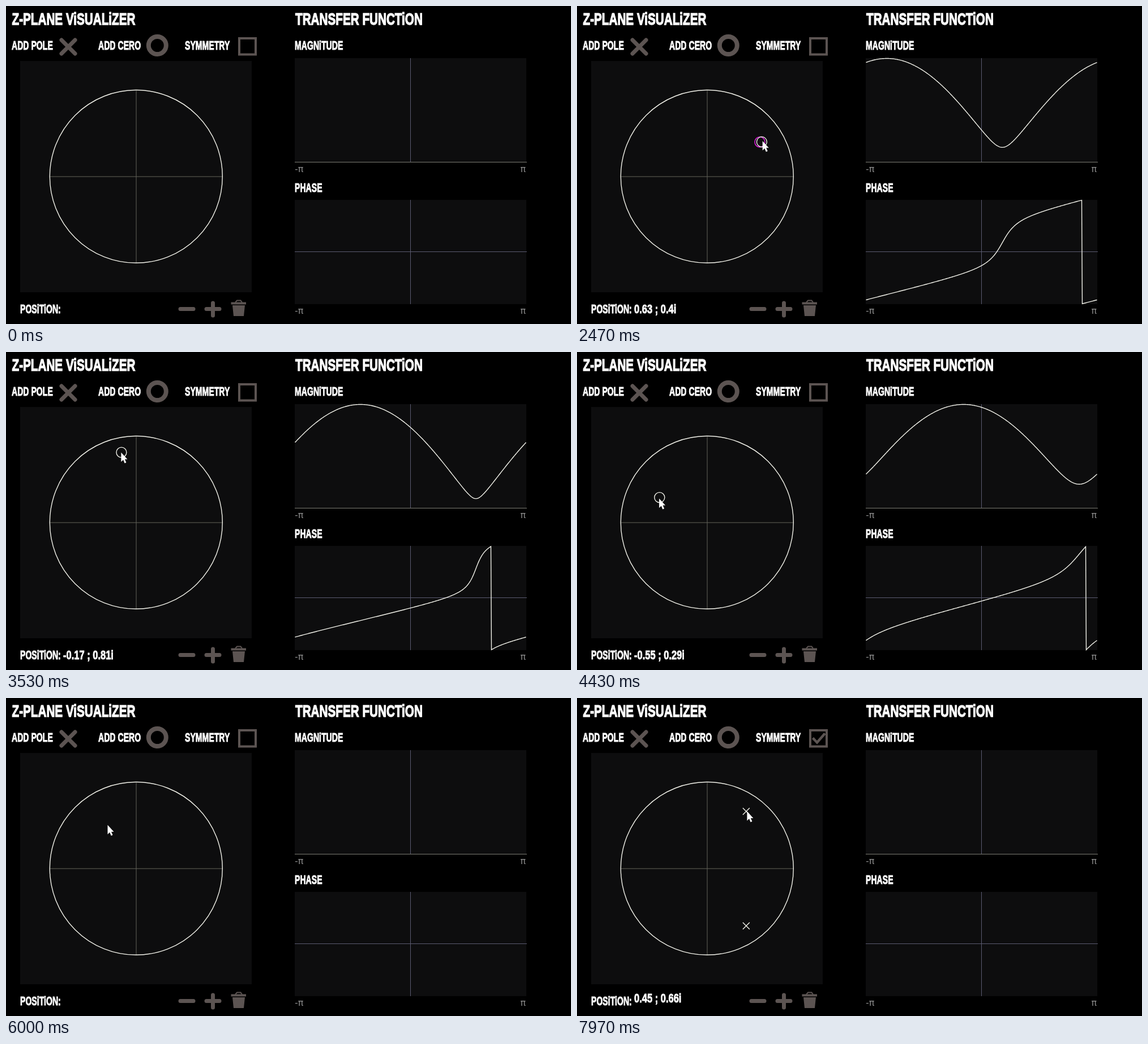
An HTML page that plays this animation: 998 px wide and 561 px high, repeating every 8000 ms.

```html
<!DOCTYPE html>
<html lang="en">
<head>
<meta charset="utf-8">
<title>Z-plane visualizer</title>
<style>
html, body { margin: 0; width: 100%; height: 100%; overflow: hidden; background: #000; }
svg { display: block; width: 100vw; height: 100vh; }
text { font-family: "Liberation Sans", Arial, sans-serif; font-weight: 700; fill: #fff; }
.title, .label, .value { stroke: #fff; stroke-width: .8; vector-effect: non-scaling-stroke; }
.title { font-size: 20.7px; stroke-width: 1.2; }
.label { font-size: 14.1px; }
.value { font-size: 16.5px; }
.pi { font: 400 16px "DejaVu Sans", sans-serif; fill: #8a8a8a; }
.panel { fill: #0d0d0e; }
.icon { fill: none; stroke: #5c5452; }
.solid { fill: #5c5452; }
.axis { stroke: #5a5a70; }
.plane { stroke: #64645a; }
.base { stroke: #7c7c74; }
.line { fill: none; stroke: #f2f2ea; stroke-width: 1.4; }
.hover { fill: none; stroke: #e01ee0; stroke-width: 1.5; }
</style>
</head>
<body>
<svg viewBox="0 0 998 561" preserveAspectRatio="none">
  <rect width="998" height="561"/>
  <g id="labels"></g>

  <g class="icon" stroke-width="7">
    <path d="M98 60L122 84M122 60L98 84" stroke-linecap="round"/>
    <circle cx="267.3" cy="69.5" r="15.5" stroke-width="8"/>
    <rect x="412" y="57" width="29" height="28.5" stroke-width="4"/>
    <path id="check" d="M416.5 70.5L424 78.5L438 62.5" stroke-width="4.5"/>
    <path d="M308 534.5H331M354 534.5H377M365.500 524V546" stroke-linecap="round"/>
  </g>
  <g class="solid">
    <path d="M397.5 522.5H424V526.5H397.5ZM400 528H422L420 547H402Z"/>
    <path d="M405 523L408 519.5H414.5L417 523" fill="none" stroke="#5c5452" stroke-width="2"/>
  </g>

  <rect class="panel" x="25" y="97" width="409" height="408"/>
  <path class="plane" d="M77 301H383M230 148V454"/>
  <circle class="line" cx="229.8" cy="300.8" r="152.5"/>

  <rect class="panel" x="510" y="92" width="409" height="184"/>
  <rect class="panel" x="510" y="342" width="409" height="184"/>
  <path class="axis" d="M714.5 92V276M714.5 342V526M510 433.5H920"/>
  <path class="base" d="M510 275.5H920"/>
  <path id="mag" class="line"/>
  <path id="phase" class="line"/>

  <circle id="halo" class="hover" r="9"/>
  <circle id="zero" class="line" r="9"/>
  <path id="pole" class="line" d="M-6 -6L6 6M6 -6L-6 6"/>
  <path id="twin" class="line" d="M-6 -6L6 6M6 -6L-6 6"/>
  <path id="cursor" fill="#fff" d="M0 0V16.5L3.7 13L6.2 19L9 17.8L6.5 12H11Z"/>
</svg>
<script>
const LOOP = 8000, CX = 230, CY = 301, R = 153;
const LAG = 25; // markers trail the pointer slightly
const ENTER = 250, PICK = 900, DROP = 1700, GRAB = 2400, RELEASE = 5700,
      REMOVE = 5800, CHECK = 6720, PICK_POLE = 7470;
const $ = id => document.getElementById(id);

// Stops of the pointer: time, place
const zeroIcon = [267, 71], poleIcon = [112, 74], box = [425, 67];
const dropped = [323, 240], held = [326, 244], rest = [178, 224];
const PATH = [
  [ENTER, [330, 250]], [800, zeroIcon], [PICK, zeroIcon], [1270, [271.3, 126.6]],
  [DROP, dropped], [2100, dropped], [2130, held], [GRAB, held], [2470, [326.4, 239.8]],
  [3530, [204, 177.1]], [4430, [145.9, 256.6]], [5050, [78, 296]],
  [RELEASE, rest], [6060, rest], [6520, box], [6850, box],
  [7330, poleIcon], [PICK_POLE, poleIcon], [7970, [298.9, 200]]
].map(([t, p]) => [t, ...p]);

function slope(i, k) {
  const a = PATH[i - 1], b = PATH[i], c = PATH[i + 1];
  if (!a || !c) return 0;
  const u = (b[k] - a[k]) / (b[0] - a[0]), v = (c[k] - b[k]) / (c[0] - b[0]);
  return u * v <= 0 ? 0 : 2 * u * v / (u + v);
}

// Smooth curve through the stops, without overshoot
function pointAt(t) {
  const last = PATH.length - 1;
  t = Math.max(PATH[0][0], Math.min(PATH[last][0], t));
  let i = 0;
  while (i < last - 1 && t > PATH[i + 1][0]) i++;
  const a = PATH[i], b = PATH[i + 1], h = b[0] - a[0], s = (t - a[0]) / h;
  return [1, 2].map(k =>
    a[k] * (1 + 2 * s) * (1 - s) ** 2 + b[k] * s * s * (3 - 2 * s) +
    h * slope(i, k) * s * (1 - s) ** 2 + h * slope(i + 1, k) * s * s * (s - 1));
}

function label(text, x, y, cls, tall = 1) {
  const el = document.createElementNS("http://www.w3.org/2000/svg", "text");
  el.textContent = text;
  el.setAttribute("class", cls);
  el.setAttribute("transform", `translate(${x} ${y}) scale(1 ${tall})`);
  $("labels").append(el);
  return el;
}

label("Z-PLANE ViSUALiZER", 10.5, 33, "title", 1.45);
label("TRANSFER FUNCTiON", 511, 33, "title", 1.45);
["ADD POLE", "ADD CERO", "SYMMETRY"].forEach((s, i) => label(s, 10 + 153 * i, 77, "label", 1.5));
label("MAGNiTUDE", 510, 77, "label", 1.5);
label("PHASE", 510, 328, "label", 1.5);
label("POSiTiON:", 25, 542, "label", 1.5);
for (const y of [293, 543]) {
  label("-π", 510, y, "pi");
  label("π", 908.5, y, "pi");
}
const value = label("", 101, 542, "value");

const show = (el, on) => el.setAttribute("visibility", on ? "visible" : "hidden");
const place = (el, x, y) => el.setAttribute("transform", `translate(${x} ${y})`);
const within = (t, a, b) => t >= a && t < b;

function plot(x, y) {
  const re = (x - CX) / R, im = (CY - y) / R, top = 1 + Math.hypot(re, im);
  let mag = "", phase = "";
  for (let i = 0; i <= 408; i++) {
    const w = (i / 204 - 1) * Math.PI;
    const dx = Math.cos(w) - re, dy = Math.sin(w) - im;
    const step = (i ? "L" : "M") + (510.5 + i) + " ";
    mag += step + (276 - 183.5 * Math.hypot(dx, dy) / top).toFixed(2);
    phase += step + (434 - 91.5 * Math.atan2(dy, dx) / Math.PI).toFixed(2);
  }
  $("mag").setAttribute("d", mag);
  $("phase").setAttribute("d", phase);
}

function draw(t) {
  const addZero = within(t, PICK, DROP), addPole = t >= PICK_POLE;
  const dragging = within(t, GRAB, RELEASE), placed = within(t, DROP, REMOVE);
  const fresh = within(t, DROP, GRAB + 90); // hover ring lingers as the drag begins
  const tip = pointAt(t + LAG);
  const p = within(t, DROP, GRAB) ? dropped : pointAt(t);

  show($("cursor"), t >= ENTER);
  place($("cursor"), tip[0] + 1.5, tip[1]);

  show($("zero"), addZero || dragging);
  place($("zero"), ...p);
  show($("halo"), fresh || within(t, RELEASE, REMOVE));
  place($("halo"), ...(fresh ? dropped : p));

  show($("pole"), addPole);
  show($("twin"), addPole);
  place($("pole"), ...p);
  place($("twin"), p[0], 2 * CY - p[1]);
  show($("check"), t >= CHECK);

  show($("mag"), placed);
  show($("phase"), placed);
  if (placed) plot(...p);

  const num = v => +(v / R).toFixed(2) || 0;
  value.textContent = addZero || addPole || dragging
    ? `${num(p[0] - CX)} ; ${num(CY - p[1])}i` : "";
  value.setAttribute("transform", `translate(101 ${dragging ? 542 : 537}) scale(1 1.35)`);
}

const start = performance.now();
function tick(now) {
  draw(Math.max(0, now - start) % LOOP);
  requestAnimationFrame(tick);
}
draw(0);
requestAnimationFrame(tick);
</script>
</body>
</html>
```
